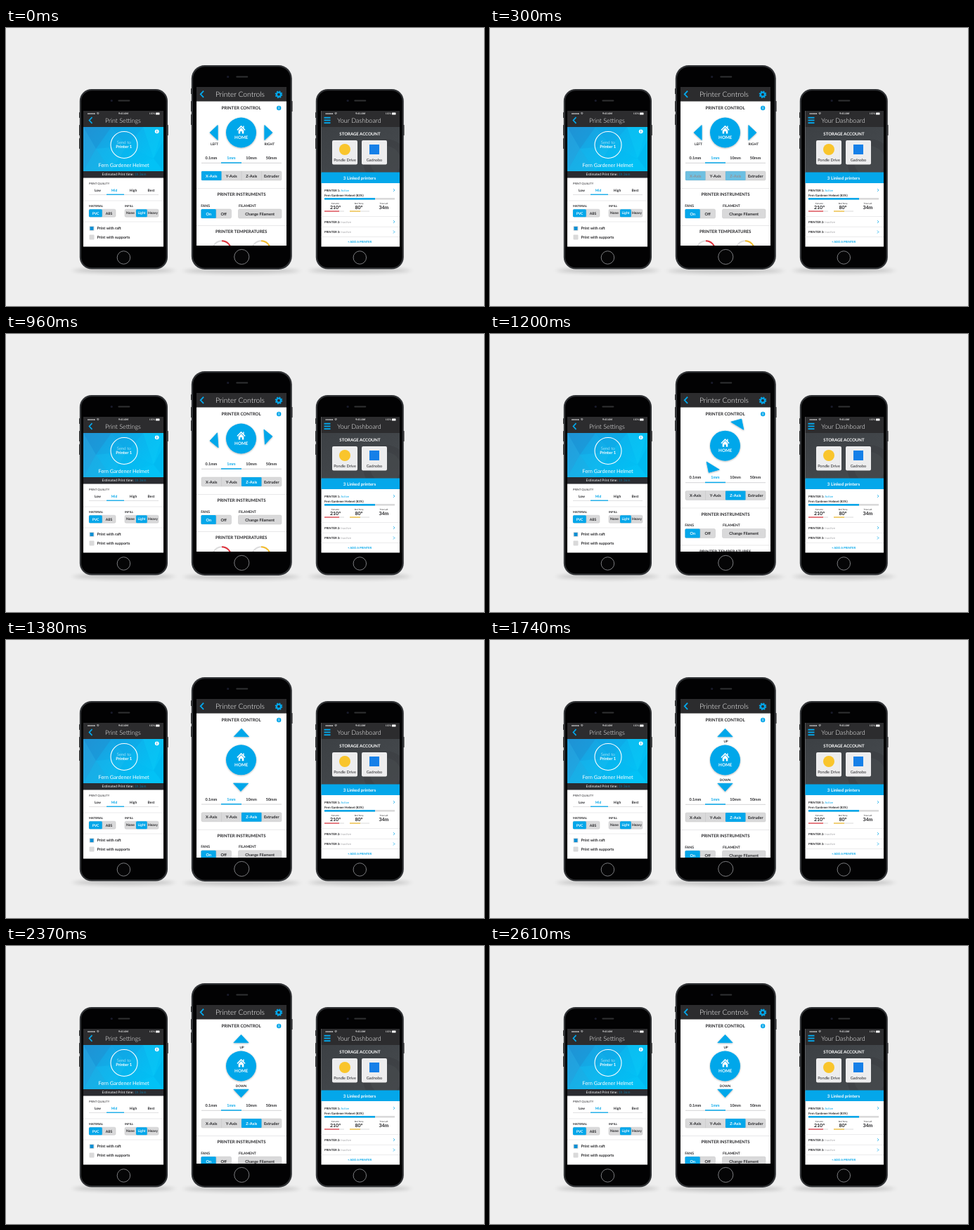
These frames come from a looping animation (680 px wide and 396 px high, 2.64 s). An HTML page:

```html
<!DOCTYPE html>
<html lang="en">
<head>
<meta charset="utf-8">
<title>Printer app</title>
<style>
html, body { margin: 0; width: 100%; height: 100%; overflow: hidden; background: #eee; }
svg { display: block; width: 680px; height: 396px; font-family: Lato, sans-serif; text-rendering: geometricPrecision; }
</style>
</head>
<body>
<svg id="stage" viewBox="0 0 680 396"></svg>
<script>
const BLUE = '#04a7ea', INK = '#262629', GREY = '#d9d9da', RULE = '#e3e3e4', LOOP = 2640;

// Drawing helpers; text is placed by its vertical centre
const rect = (x, y, w, h, fill, r = 0, extra = '') =>
  `<rect x="${x}" y="${y}" width="${w}" height="${h}" rx="${r}" fill="${fill}" ${extra}/>`;
const circle = (x, y, r, fill, extra = '') => `<circle cx="${x}" cy="${y}" r="${r}" fill="${fill}" ${extra}/>`;
const poly = (points, fill, extra = '') => `<polygon points="${points}" fill="${fill}" ${extra}/>`;
const line = (d, color, width = 1, extra = '') =>
  `<path d="${d}" fill="none" stroke="${color}" stroke-width="${width}" ${extra}/>`;
const text = (s, x, y, size, fill = INK, weight = 700, anchor = 'middle') =>
  `<text x="${x}" y="${y + size * 0.36}" font-size="${size}" fill="${fill}" font-weight="${weight}" text-anchor="${anchor}">${s}</text>`;
const left = (s, x, y, size, fill, weight) => text(s, x, y, size, fill, weight, 'start');
const span = (s, fill, weight) => `<tspan fill="${fill}" font-weight="${weight}">${s}</tspan>`;
const group = (id, body, extra = '') => `<g id="${id}" ${extra}>${body}</g>`;

const chevron = (x, y, w, h, width) => line(`M${x + w} ${y - h}L${x} ${y}L${x + w} ${y + h}`, BLUE, width);
const info = (x, y, r, bg, fg) => circle(x, y, r, bg) +
  rect(x - .45, y - .6, .9, 2.3, fg) + circle(x, y - 1.6, .55, fg);

// Row of joined buttons with one switched on
function segments(x, y, w, h, labels, active, size) {
  let out = rect(x, y, w * labels.length, h, GREY, 1.8, 'stroke="#c4c4c6" stroke-width=".5"');
  labels.forEach((label, i) => {
    const x0 = x + w * i;
    if (i) out += line(`M${x0} ${y}v${h}`, '#c4c4c6', .6);
    if (i === active) out += rect(x0, y, w, h, BLUE, 1.5);
    out += text(label, x0 + w / 2, y + h / 2, size, i === active ? '#fff' : INK);
  });
  return out;
}

function phone(x, y, w, h, screen, button, radius) {
  const mid = x + w / 2, top = y + (screen.y - y) / 2 + 1;
  return `<ellipse cx="${mid}" cy="${y + h + 2}" rx="${w * .57}" ry="4" fill="#000" opacity=".16" filter="url(#soft)"/>` +
    rect(x - .8, y + 33, 2, 8, '#333', .6) + rect(x - .8, y + 51, 2, 15, '#333', .6) +
    rect(x - .8, y + 70, 2, 15, '#333', .6) + rect(x + w - 1.2, y + 51, 2, 15, '#333', .6) +
    rect(x, y, w, h, '#303235', radius) +
    rect(x + 2.2, y + 2.2, w - 4.4, h - 4.4, '#020203', radius - 2) +
    circle(mid - w * .137, top, 1.6, '#191b2b') + rect(mid - 8, top - 1, 17, 2, '#303133', 1) +
    circle(mid, button, w * .074, '#050506', 'stroke="#7b7c7f" stroke-width="1"') +
    rect(screen.x, screen.y, screen.w, screen.h, '#fff');
}

const statusBar = (x, w) => {
  let out = rect(x, 118, w, 23, '#2c2c2e') + text('9:41 AM', x + w / 2, 122, 3.6, '#fff');
  for (let i = 0; i < 5; i++) out += circle(x + 7 + i * 2.2, 122, .85, '#fff');
  return out + line(`M${x + 19} 121.3q1.7 -1.2 3.4 0M${x + 19.8} 122.6q.9 -.7 1.8 0`, '#fff', .7) +
    text('100%', x + w - 16, 122, 3.4, '#fff', 400) + rect(x + w - 11, 120.6, 5.5, 2.8, '#fff', .5);
};

function settingsScreen() {
  const facets = [
    ['110,141 150,141 128,172', '#1e8fd2', .5], ['110,141 128,172 110,204', '#2aa3de', .5],
    ['128,172 150,204 110,204', '#1fb4e8', .5], ['150,141 195,141 172,168', '#0fa0e2', .4],
    ['128,172 172,168 150,204', '#16bdf0', .4], ['172,168 210,186 150,204', '#04b8f0', .4],
    ['195,141 224,141 210,186', '#0cc8f6', .4], ['210,186 224,160 224,204', '#00aeea', .4]
  ];
  const quality = ['Low', 'Mid', 'High', 'Best'], qualityX = [130.5, 154, 181, 206.5];
  return statusBar(110, 114) + chevron(118.5, 131.5, 4, 4.3, 1.7) + text('Print Settings', 166.3, 131.8, 8.9, '#fff', 300) +
    rect(110, 141, 114, 63, 'url(#sky)') + facets.map(([p, c, o]) => poly(p, c, `opacity="${o}"`)).join('') +
    circle(168, 166.5, 19, 'none', 'stroke="#fff" stroke-width="1.1"') +
    text('Send to', 167.7, 163.3, 6, '#fff', 300) + text('Printer 1', 167.7, 169.2, 5.9, '#fff') +
    info(214.7, 147.3, 2.9, '#fff', BLUE) + text('Fern Gardener Helmet', 167.5, 195, 7.4, '#fff', 400) +
    rect(110, 204, 114, 9.5, '#2b2c31') +
    text('Estimated Print time: ' + span('1h 36m', BLUE, 300), 168, 208.5, 4.9, '#fff', 400) +
    left('PRINT QUALITY', 118, 221.3, 4, INK, 400) +
    quality.map((q, i) => text(q, qualityX[i], 230.8, 4.9, i === 1 ? BLUE : INK)).join('') +
    line('M118 237.5H217', GREY, .8) + line('M143 237.2H168', BLUE, 1.3) + line('M110 246H224', RULE, .7) +
    left('MATERIAL', 118, 253.3, 4.1) + left('INFILL', 169, 253.3, 4.1) +
    segments(118, 258.2, 19, 11, ['PVC', 'ABS'], 0, 5) + segments(169, 258.2, 16, 11, ['None', 'Light', 'Heavy'], 1, 4.9) +
    line('M110 276H224', RULE, .7) +
    rect(118.5, 282, 7, 7, GREY, 1) + rect(119.5, 283, 5, 5, '#0a8fd4', .4) + left('Print with raft', 129.5, 285.5, 5.5) +
    rect(118.5, 294.6, 7, 7, GREY, 1) + left('Print with supports', 129.5, 297.8, 5.5);
}

function controlsScreen() {
  const house = poly('328.4,145 334.5,138.8 340.6,145 339.5,146.1 334.5,141.1 329.5,146.1', '#fff') +
    '<path d="M330.7 145.9L334.5 142.1L338.3 145.9V150.5H335.8V147.2H333.2V150.5H330.7Z" fill="#fff"/>' + rect(337.2, 139.5, 1.4, 3, '#fff');
  const arrow = dir => poly(`${44.6 * dir},0 ${33.3 * dir},-10.6 ${33.3 * dir},10.6`, BLUE,
    `stroke="${BLUE}" stroke-width=".8" stroke-linejoin="round"`);
  const axes = ['X-Axis', 'Y-Axis', 'Z-Axis', 'Extruder'];
  const activeTab = (id, i) => group(id, rect(278 + 28.5 * i, 204, 28.5, 13, BLUE, 1) +
    text(axes[i], 292.25 + 28.5 * i, 210.5, 5.6, '#fff'));
  const gauge = (x, color, end) => circle(x, 316.5, 13.2, 'none', 'stroke="#dcdcdd" stroke-width="2"') +
    line(`M${x} 303.3A13.2 13.2 0 0 1 ${x + end} 316.5`, color, 2);
  const home = group('home',
    `<g filter="url(#drop)">${circle(334.5, 149, 21.5, BLUE)}</g>` + house + text('HOME', 334.7, 156, 6.2, '#fff') +
    `<g transform="translate(334.5 149)"><g filter="url(#drop)">` + group('arrows', arrow(-1) + arrow(1)) + '</g>' +
    group('sides', text('LEFT', -38, 16.5, 4.8) + text('RIGHT', 40.3, 16.5, 4.8)) +
    group('poles', text('UP', 1, -27, 4.6) + text('DOWN', 0, 28, 4.6)) + '</g>');
  const lower = group('lower',
    ['0.1mm', '1mm', '10mm', '50mm'].map((s, i) => text(s, 292 + 28.5 * i, 185, 5.5, i === 1 ? BLUE : INK)).join('') +
    line('M278 192.3H392', '#cfcfd1', .9) + line('M306 192H335', BLUE, 1.5) +
    segments(278, 204, 28.5, 13, axes, -1, 5.6) + activeTab('tabX', 0) + activeTab('tabZ', 2) +
    line('M271 228.5H399', RULE, .8) + text('PRINTER INSTRUMENTS', 335, 237, 6.05) +
    left('FANS', 277.3, 252.8, 5) + left('FILAMENT', 331, 252.8, 5) +
    segments(277.5, 258, 21.5, 13, ['On', 'Off'], 0, 5.6) + segments(330.5, 258, 61.5, 13, ['Change Filament'], -1, 5.6) +
    line('M271 281.5H399', RULE, .8) + text('PRINTER TEMPERATURES', 334.7, 290.3, 6.1) +
    gauge(307, '#e0323c', 13.2) + gauge(363, '#f5bd2c', 13.2));
  return `<g clip-path="url(#mid)">` + lower + home + rect(271, 84, 128, 20.5, '#2c2c2e') +
    chevron(276.8, 94.3, 4.3, 4.6, 1.9) + text('Printer Controls', 333, 94.7, 10.3, '#fff', 300) +
    circle(388, 94.7, 3.1, 'none', `stroke="${BLUE}" stroke-width="2.4"`) +
    circle(388, 94.7, 4.6, 'none', `stroke="${BLUE}" stroke-width="1.5" stroke-dasharray="1.9 1.713"`) +
    text('PRINTER CONTROL', 334.6, 114.2, 6.15) + info(388.2, 114, 3.2, BLUE, '#fff') + '</g>';
}

function dashboardScreen() {
  const printer = (n, y, state, color) => left(`PRINTER ${n}: ` + span(state, color, 400), 453, y, 4.25) +
    line(`M551 ${y - 1.9}l1.9 1.9l-1.9 1.9`, BLUE, .8);
  const tile = (x, label) => rect(x, 160, 36, 34.5, '#ededee', 2) + text(label, x + 18, 187.6, 5.6, INK, 400);
  const reading = (x, label, value) => text(label, x, 250.2, 2.9, INK, 400) + text(value, x, 255.4, 7);
  return statusBar(448.5, 111.5) + [127.8, 131.5, 135.2].map(y => rect(452.5, y - 1, 9, 1.9, BLUE)).join('') +
    text('Your Dashboard', 502.5, 131.8, 9.1, '#fff', 300) +
    `<g clip-path="url(#photo)">` + rect(448, 141, 112, 66, 'url(#room)') +
    circle(540, 190, 32, '#3a3c40', 'opacity=".5"') + circle(540, 190, 22, '#4d5054', 'opacity=".4"') + '</g>' +
    text('STORAGE ACCOUNT', 503.5, 151, 6.05, '#fff') +
    tile(464, 'Pondle Drive') + circle(482, 173, 8, '#f9c52c') + tile(506, 'Gadnobo') + rect(517, 166, 14, 14, '#1680e8') +
    rect(448.5, 205.5, 111.5, 15.5, BLUE) + text('3 Linked printers', 503, 213.5, 6.2, '#fff') +
    printer(1, 231, 'Active', BLUE) + left('Fern Gardener Helmet (83%)', 453, 238.6, 4.4) +
    rect(453, 242, 100, 2.6, GREY) + rect(453, 242, 72, 2.6, BLUE) +
    reading(468.5, 'Extruder', '210°') + reading(502, 'Bed Temp', '80°') + reading(537.5, 'Time Left', '34m') +
    line('M453 261H481M489 261H517', GREY, 1.1) + line('M453 261H474', '#e0323c', 1.2) + line('M489 261H504', '#f5bd2c', 1.2) +
    line('M448.5 268.5H560M448.5 283.3H560M448.5 297.5H560', RULE, .7) +
    printer(2, 276, 'Inactive', '#a5a5a8') + printer(3, 290.5, 'Inactive', '#a5a5a8') +
    text('+ ADD A PRINTER', 503, 305, 4.15, BLUE);
}

const $ = id => document.getElementById(id);
$('stage').innerHTML = `<defs>
  <filter id="soft" x="-20%" y="-300%" width="140%" height="700%"><feGaussianBlur stdDeviation="5 2.4"/></filter>
  <filter id="drop" x="-30%" y="-70%" width="160%" height="240%"><feDropShadow dx="0" dy=".7" stdDeviation="1" flood-opacity=".35"/></filter>
  <clipPath id="mid">${rect(271, 84, 128, 226, '#000')}</clipPath>
  <clipPath id="photo">${rect(448.5, 141, 111.5, 66, '#000')}</clipPath>
  <linearGradient id="sky" x2="1" y2=".5"><stop stop-color="#2196d8"/><stop offset=".55" stop-color="#0db2ec"/><stop offset="1" stop-color="#02c2f6"/></linearGradient>
  <linearGradient id="room" x2="1" y2="1"><stop stop-color="#3c4044"/><stop offset="1" stop-color="#474b4f"/></linearGradient>
</defs>` + rect(0, 0, 680, 396, '#eee') +
  phone(104.8, 87, 125.2, 256.5, { x: 110, y: 118, w: 114, h: 193.5 }, 327, 17) + settingsScreen() +
  phone(263.8, 53, 143, 291, { x: 271, y: 84, w: 128, h: 226 }, 326, 19) + controlsScreen() +
  phone(440.8, 87, 125, 256.5, { x: 448.5, y: 118, w: 111.5, h: 193.5 }, 327, 17) + dashboardScreen();

const ramp = (t, from, to) => Math.min(1, Math.max(0, (t - from) / (to - from)));
const ease = (t, from, to) => (1 - Math.cos(Math.PI * ramp(t, from, to))) / 2;

function draw(now) {
  const t = now % LOOP, swap = ramp(t, 200, 400), slide = ease(t, 1020, 1400);
  $('tabX').setAttribute('opacity', 1 - swap);
  $('tabZ').setAttribute('opacity', swap);
  $('sides').setAttribute('opacity', 1 - ramp(t, 680, 880));
  $('poles').setAttribute('opacity', ramp(t, 1450, 1650));
  $('arrows').setAttribute('transform', `rotate(${-90 * ease(t, 890, 1410)})`);
  $('home').setAttribute('transform', `translate(0 ${22 * slide})`);
  $('lower').setAttribute('transform', `translate(0 ${42 * slide})`);
}
function tick() {
  draw(performance.now());
  requestAnimationFrame(tick);
}
tick();
</script>
</body>
</html>
```
